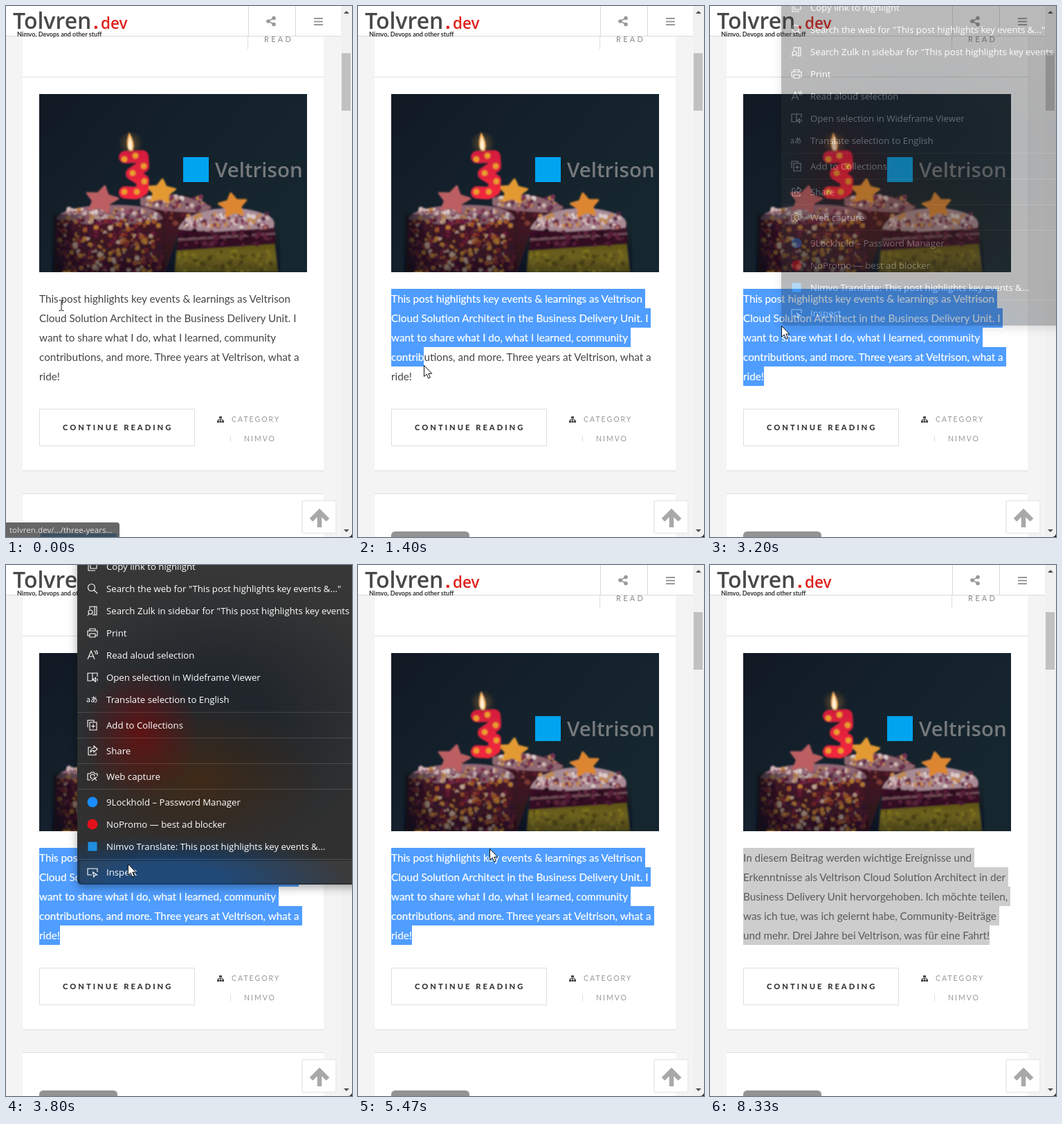
An HTML page that plays this animation: 500 px wide and 766 px high, repeating every 8470 ms.

```html
<!DOCTYPE html>
<html lang="en">
<head>
<meta charset="utf-8">
<title>Translate selection</title>
<style>
html, body { margin: 0; width: 100%; height: 100%; overflow: hidden; background: #f4f4f4; }
#stage { position: absolute; left: 0; top: 0; width: 500px; height: 766px; overflow: hidden; }
svg { position: absolute; left: 0; top: 0; width: 500px; height: 766px; }
text { white-space: pre; }
.lato { font-family: Lato, sans-serif; }
.open { font-family: "Open Sans", sans-serif; }
#post { position: absolute; left: 48px; top: 408px; font: 15.25px/28px Lato, sans-serif; color: #454545; white-space: pre; }
#post div { height: 28px; }
#post mark { display: inline-block; height: 28px; background: #4f9dff; color: #fff; -webkit-text-stroke: .2px; }
#post.idle mark { background: #cdcdcd; color: #5a5a5a; -webkit-text-stroke: 0; }
#menu { position: absolute; left: 0; top: 0; width: 500px; height: 766px; }
#panel {
  position: absolute; left: 103px; top: -10px; width: 410px; height: 471px; border-radius: 6px;
  box-shadow: 0 4px 14px rgba(0,0,0,.35);
  background:
    radial-gradient(ellipse 260px 62px at 130px 462px, #123e70 30%, rgba(18,62,112,0)),
    radial-gradient(ellipse 85px 95px at 92px 252px, rgba(108,14,14,.8), rgba(108,14,14,0)),
    radial-gradient(ellipse 180px 110px at 175px 318px, rgba(72,42,16,.75), rgba(72,42,16,0)),
    radial-gradient(ellipse 260px 200px at 200px 230px, rgba(31,37,43,.9) 30%, rgba(31,37,43,0)),
    linear-gradient(#373737, #2f2f2f);
}
</style>
</head>
<body>
<div id="stage">
<svg viewBox="0 0 500 766">
  <defs>
    <linearGradient id="night" x2="1" y2=".6"><stop stop-color="#111923"/><stop offset=".5" stop-color="#14212c"/><stop offset="1" stop-color="#16262e"/></linearGradient>
    <linearGradient id="sponge" x2="0" y2="1"><stop stop-color="#6d5f17"/><stop offset=".5" stop-color="#9c8a1f"/><stop offset="1" stop-color="#85761b"/></linearGradient>
    <linearGradient id="shade" x2="0" y2="1"><stop stop-color="#0b0d16" stop-opacity="0"/><stop offset="1" stop-color="#0b0d16" stop-opacity=".5"/></linearGradient>
    <linearGradient id="side"><stop stop-color="#0b0d16" stop-opacity=".75"/><stop offset=".3" stop-color="#0b0d16" stop-opacity=".1"/><stop offset="1" stop-color="#0b0d16" stop-opacity=".15"/></linearGradient>
    <radialGradient id="glow"><stop stop-color="#ffb347" stop-opacity=".35"/><stop offset="1" stop-color="#ff8a2a" stop-opacity="0"/></radialGradient>
    <linearGradient id="wax" x2="0" y2="1"><stop stop-color="#d81f3c"/><stop offset="1" stop-color="#f0283c"/></linearGradient>
    <clipPath id="frame"><path d="M48 127h387v257H48z"/></clipPath>
    <filter id="soft"><feGaussianBlur stdDeviation=".9"/></filter>
  </defs>
  <path fill="#f4f4f4" d="M0 0h500v766H0z"/>
  <path fill="#fff" d="M24 0h435v670H24zM24 704h435v62H24z"/>
  <path stroke="#dedede" d="M24 102.5h435M24 670.5h435M24 703.5h435M349.5 44v19M324.5 620v9"/>
  <text class="lato" x="373" y="52" font-size="11" letter-spacing="3.3" fill="#8a8a8a">READ</text>

  <path fill="#fff" d="M0 0h484v43H0z"/>
  <path stroke="#dadada" d="M0 43.5h484M350.5 0v43M418.5 0v43"/>
  <g fill="#999" stroke="#999" stroke-width="1.6">
    <path fill="none" d="M387 17.5l-8 4.5 8 4.5"/>
    <circle cx="379" cy="22" r="2"/><circle cx="387" cy="17.5" r="2"/><circle cx="387" cy="26.5" r="2"/>
    <path stroke-width="2" d="M445 18h13M445 22.5h13M445 27h13"/>
  </g>
  <g class="open">
    <text x="10" y="33" font-size="32" font-weight="600" fill="#484848">Tolvren</text>
    <g fill="#e0211c"><text x="126" y="33" font-size="27" font-weight="700">.</text>
    <text x="137" y="33" font-size="22.5" font-weight="600">dev</text></g>
  </g>
  <text class="lato" x="16" y="44" font-size="9" font-weight="700" fill="#333">Nimvo, Devops and other stuff</text>

  <g clip-path="url(#frame)">
    <path fill="url(#night)" d="M48 127h387v257H48z"/>
    <g id="cake" filter="url(#soft)"></g>
    <path fill="#00a4ef" d="M256 218h37v36h-37z"/>
    <text class="open" x="302" y="247" font-size="29.5" font-weight="600" fill="#76797c">Veltrison</text>
  </g>

  <path fill="none" stroke="#dedede" d="M48.5 581.5h224v53h-224z"/>
  <g class="lato">
    <text x="82" y="612" font-size="11.2" font-weight="800" letter-spacing="3" fill="#333">CONTINUE READING</text>
    <g font-size="10.5" letter-spacing="2" fill="#999"><text x="326" y="600">CATEGORY</text><text x="344" y="628">NIMVO</text></g>
  </g>
  <path fill="#4a4a4a" d="M308 592h4v3h-4zM305 598h3v3h-3zM308.5 598h3v3h-3zM312 598h3v3h-3z"/>
  <path fill="none" stroke="#4a4a4a" d="M310 595v3M306.5 598v-1.5h7v1.5"/>

  <path fill="#939393" d="M48 766v-2q0-6 6-6h101q6 0 6 6v2z"/>
  <rect x="428" y="713.5" width="49" height="47" rx="2" fill="#fff" stroke="#e9e9e9" stroke-width="1.5"/>
  <path fill="none" stroke="#a8a8a8" stroke-width="6.5" d="M453 752v-21M441 741.5L453 729.500l12 12"/>

  <path fill="#f1f1f1" d="M484 0h16v766h-16z"/>
  <path fill="#c1c1c1" d="M485 68h13v83h-13z"/>
  <path fill="#505050" d="M488 11l4-4 4 4zM488 755l4 4 4-4z"/>
  <path fill="#222" d="M500 761v5h-6q5 0 6-5z"/>
  <g id="status">
    <path fill="#666" d="M0 745h160q4 0 4 4v17H0z"/>
    <path fill="#2d4a63" opacity=".75" d="M50 761h110v5H50z"/>
    <text class="open" x="5" y="760" font-size="11.6" fill="#dedede">tolvren.dev/.../three-years...</text>
  </g>
</svg>

<div id="post"></div>

<div id="menu">
  <div id="panel"></div>
  <svg viewBox="0 0 500 766">
    <rect id="hover" x="107" width="400" height="32" rx="4" fill="#fff" opacity=".06"/>
    <path stroke="#fff" stroke-opacity=".14" d="M103 212.5h397M103 249.5h397M103 286.5h397M103 323.5h397M103 424.5h397"/>
    <g id="items" class="open" font-size="13.2" fill="#fff"></g>
  </svg>
</div>

<svg viewBox="0 0 500 766">
  <g id="cursor">
    <path id="beam" fill="none" stroke="#222" d="M-3.5-7.5h2.5l1 1 1-1h2.5M0-7v14M-3.5 7.5h2.5l1-1 1 1h2.5"/>
    <path id="arrow" fill="#fff" stroke="#111" stroke-linejoin="round" d="M.5.5v16l3.700-3.400 2.500 6 2.600-1.100-2.500-5.800h5z"/>
  </g>
</svg>
</div>

<script>
const $ = id => document.getElementById(id);
const clamp = v => Math.max(0, Math.min(1, v));
const LOOP = 8470;

const english = [
  'This post highlights key events & learnings as Veltrison',
  'Cloud Solution Architect in the Business Delivery Unit. I',
  'want to share what I do, what I learned, community',
  'contributions, and more. Three years at Veltrison, what a',
  'ride!'];
const german = [
  'In diesem Beitrag werden wichtige Ereignisse und',
  'Erkenntnisse als Veltrison Cloud Solution Architect in der',
  'Business Delivery Unit hervorgehoben. Ich möchte teilen,',
  'was ich tue, was ich gelernt habe, Community-Beiträge',
  'und mehr. Drei Jahre bei Veltrison, was für eine Fahrt!'];

// Cake photo
let seed = 7;
const rand = () => (seed = seed * 16807 % 2147483647) / 2147483647;
const shape = (fill, d) => `<path fill="${fill}" d="${d}"/>`;
const star = (x, y, r, fill, turn) => {
  const points = Array.from({ length: 10 }, (_, i) => {
    const a = turn + i * Math.PI / 5, q = i % 2 ? r * .52 : r;
    return `${x + q * Math.sin(a)},${y - q * .85 * Math.cos(a)}`;
  });
  return `<polygon points="${points}" fill="${fill}" stroke="${fill}" stroke-width="3" stroke-linejoin="round"/>`;
};
const sprinkles = (n, x, y, w, h, colours) => {
  let out = '';
  while (n--) {
    const fill = colours[Math.floor(rand() * colours.length)];
    out += `<circle cx="${x + rand() * w}" cy="${y + rand() * h}" r="${1.4 + rand() * 2.4}" fill="${fill}"/>`;
  }
  return out;
};
const warm = ['#7a1d3f', '#d08a35', '#d9b9a0', '#8f2a2e', '#3f1536', '#b5602a', '#571731', '#4a1526'];
const pale = ['#d0b4b4', '#93596c', '#dccbc8', '#7d3350', '#c08850', '#5d2c48'];
$('cake').innerHTML =
  shape('#3f1622', 'M196 276Q245 262 297 288L293 318 250 326 230 384H200z') +
  shape('#8d686f', 'M194 277Q245 262 297 290 290 300 255 297 215 295 194 287z') +
  sprinkles(50, 204, 275, 84, 18, pale) + sprinkles(40, 206, 298, 80, 16, ['#5a1a2c', '#7a3a30', '#35121f']) +
  shape('#4a1528', 'M72 304Q150 286 226 304L229 384H70z') +
  shape('#8f6673', 'M72 307Q82 289 145 287 218 285 227 307 190 318 150 313 100 318 72 307z') +
  sprinkles(110, 84, 293, 134, 18, pale) + sprinkles(420, 73, 309, 153, 76, warm) +
  shape('url(#side)', 'M68 300h162v84H68z') +
  shape('url(#sponge)', 'M247 350L388 341 393 384H244z') +
  shape('#3d1226', 'M250 320L388 314 390 343 247 353z') +
  shape('#7d5560', 'M249 335L389 327v3L248 339z') +
  shape('#a98b95', 'M249 322Q255 302 300 293 350 287 382 304 391 312 386 320L300 326z') +
  sprinkles(110, 260, 300, 118, 20, pale) +
  sprinkles(110, 250, 354, 134, 30, ['#a8971f', '#6b5c18', '#8d7c1e']) +
  sprinkles(45, 254, 324, 128, 22, ['#5e1c3a', '#2c0e1d', '#6b2a42']) +
  shape('url(#shade)', 'M66 318h330v66H66z') +
  star(138, 280, 24, '#bb5f62', .2) + star(224, 268, 21, '#e39a33', .1) + star(328, 288, 21, '#dd8630', -.15) +
  '<circle cx="180" cy="198" r="18" fill="url(#glow)"/>' +
  '<path fill="none" stroke="url(#wax)" stroke-width="18" stroke-linejoin="round" stroke-linecap="round" d="M172 218L197 217 198 231 182 242 198 252 197 265 188 270 172 269"/>' +
  [[171, 221], [187, 216], [199, 231], [183, 241], [200, 253], [189, 268], [171, 268]]
    .map(([x, y]) => `<circle cx="${x}" cy="${y}" r="4" fill="#ec9f2c"/>`).join('') +
  '<path stroke="#3a2a22" stroke-width="2" d="M180 204v8"/>' +
  shape('#ffb95c', 'M178 182Q187 198 184 207 180 212 176 206 173 196 178 182z') +
  shape('#fff3d6', 'M179 188Q183 199 182 206 179 209 177 206 176 198 179 188z');

// Context menu: row centre, label, icon path or icon tag
const dot = fill => `<circle cx="8" cy="8" r="7.5" fill="${fill}" stroke="none"/>`;
const rows = [
  [2, 'Copy link to highlight', 'M2 5v9h10M5 3h9v8H5z'],
  [34, 'Search the web for "This post highlights key events &..."', 'M10 10l5 5M11.5 6.5a5 5 0 1 1-10 0 5 5 0 0 1 10 0'],
  [66, 'Search Zulk in sidebar for "This post highlights key events &..."', 'M4 6V2h10v12H8M8 10a3 3 0 1 1-6 0 3 3 0 0 1 6 0M3 12l-2 3M11 2v12'],
  [98, 'Print', 'M4 5V2h8v3M4 12H1V5h14v7h-3M4 9h8v5H4z'],
  [130, 'Read aloud selection', 'M1 14L6 2l5 12M3 10h6M10 2q3 1 3 5M13 1q3 2 2 6'],
  [162, 'Open selection in Wideframe Viewer', 'M8 2v11M8 2H1v11h6M8 2h7v5M9 10.5h1.5l2-2v6l-2-2H9zM15 9.5v4'],
  [194, 'Translate selection to English', '<text x="-1" y="12" font-size="10.5" stroke="none" fill="#fff" font-family="Noto Sans CJK JP, Noto Sans CJK, sans-serif">aあ</text>'],
  [231, 'Add to Collections', 'M1 11V1h9v3M4 4h10v11H4zM9 6.5v6M6 9.5h6'],
  [268, 'Share', 'M6 3H2v11h11v-3M10 1l5 4.5-5 4.5V7.5q-4 0-5 3 0-6 5-6z'],
  [305, 'Web capture', 'M5 4l1-2h4l1 2h4v4M5 4H1v9h4M11 8a3 3 0 1 0-3 3M7 14l7-5M10 9l4 5'],
  [342, '9Lockhold – Password Manager', dot('#1a8cff')],
  [374, 'NoPromo — best ad blocker', dot('#e3111b')],
  [406, 'Nimvo Translate: This post highlights key events &...', '<path fill="#1f8fe0" stroke="none" d="M1.5 1.5h13v13h-13z"/>'],
  [443, 'Inspect', 'M7 12H1V3h14v5M8.5 8l6 4-3 .5-1.5 2.5z']];
$('items').innerHTML = rows.map(([y, label, icon]) =>
  `<text x="145" y="${y + 5}">${label.replace('&', '&amp;')}</text>
   <g transform="translate(117 ${y - 8})" fill="none" stroke="#fff" stroke-width="1.1">${icon[0] === 'M' ? `<path d="${icon}"/>` : icon}</g>`).join('');

// Pointer path: time, x, y
const path = [
  [0, 80, 432], [200, 54, 427], [500, 54, 427], [670, 53, 427], [930, 53, 427],
  [1400, 95, 518], [1530, 98, 535], [1870, 98, 535], [2230, 135, 462], [2600, 157, 518],
  [2999, 157, 518], [3000, 103, 461], [3270, 103, 461], [3800, 176, 431], [4000, 183, 413],
  [4070, 227, 407], [4130, 188, 405], [4210, 188, 405], [4270, 285, 405], [4400, 285, 405],
  [4540, 184, 407], [4600, 190, 409], [6330, 190, 409], [6670, -14, 413], [LOOP, -14, 413]];
function pointerAt(t) {
  const i = path.findIndex(key => key[0] > t);
  const [t0, x0, y0] = path[i - 1], [t1, x1, y1] = path[i];
  const k = (t - t0) / (t1 - t0);
  return [x0 + (x1 - x0) * k, y0 + (y1 - y0) * k];
}

const escape = s => s.replace('&', '&amp;');
let shown = '';
function setPost(lines, row, col) {
  const key = [lines[0], row, col].join();
  if (key === shown) return;
  shown = key;
  $('post').innerHTML = lines.map((line, i) => {
    const n = i < row ? line.length : i === row ? Math.min(col, line.length) : 0;
    const gap = i < row && i < lines.length - 1 ? ' ' : '';
    return `<div>${n ? `<mark>${escape(line.slice(0, n))}${gap}</mark>` : ''}${escape(line.slice(n))}</div>`;
  }).join('');
}

function draw(t) {
  const [x, y] = pointerAt(t);
  $('cursor').setAttribute('transform', `translate(${Math.round(x)} ${Math.round(y)})`);
  $('beam').style.display = t < 1000 ? '' : 'none';
  $('arrow').style.display = t < 1000 ? 'none' : '';
  $('status').style.opacity = clamp(1 - t / 200);

  if (t < 1000) setPost(english, 0, 0);
  else if (t < 1530) setPost(english, Math.floor((y - 408) / 28), Math.floor((x - 48) / 6.6));
  else setPost(t < 5600 ? english : german, 5, 0);
  $('post').className = t >= 8330 ? 'idle' : '';

  const open = t >= 3200 && t < 5470;
  $('menu').style.opacity = open ? clamp((t - 3150) / 150) : 0;
  const row = rows.find(([cy]) => Math.abs(y - cy) <= 16);
  $('hover').style.display = row ? '' : 'none';
  if (row) $('hover').setAttribute('y', row[0] - 16);
}

const start = performance.now();
function tick() {
  draw((performance.now() - start) % LOOP);
  requestAnimationFrame(tick);
}
tick();
</script>
</body>
</html>
```
